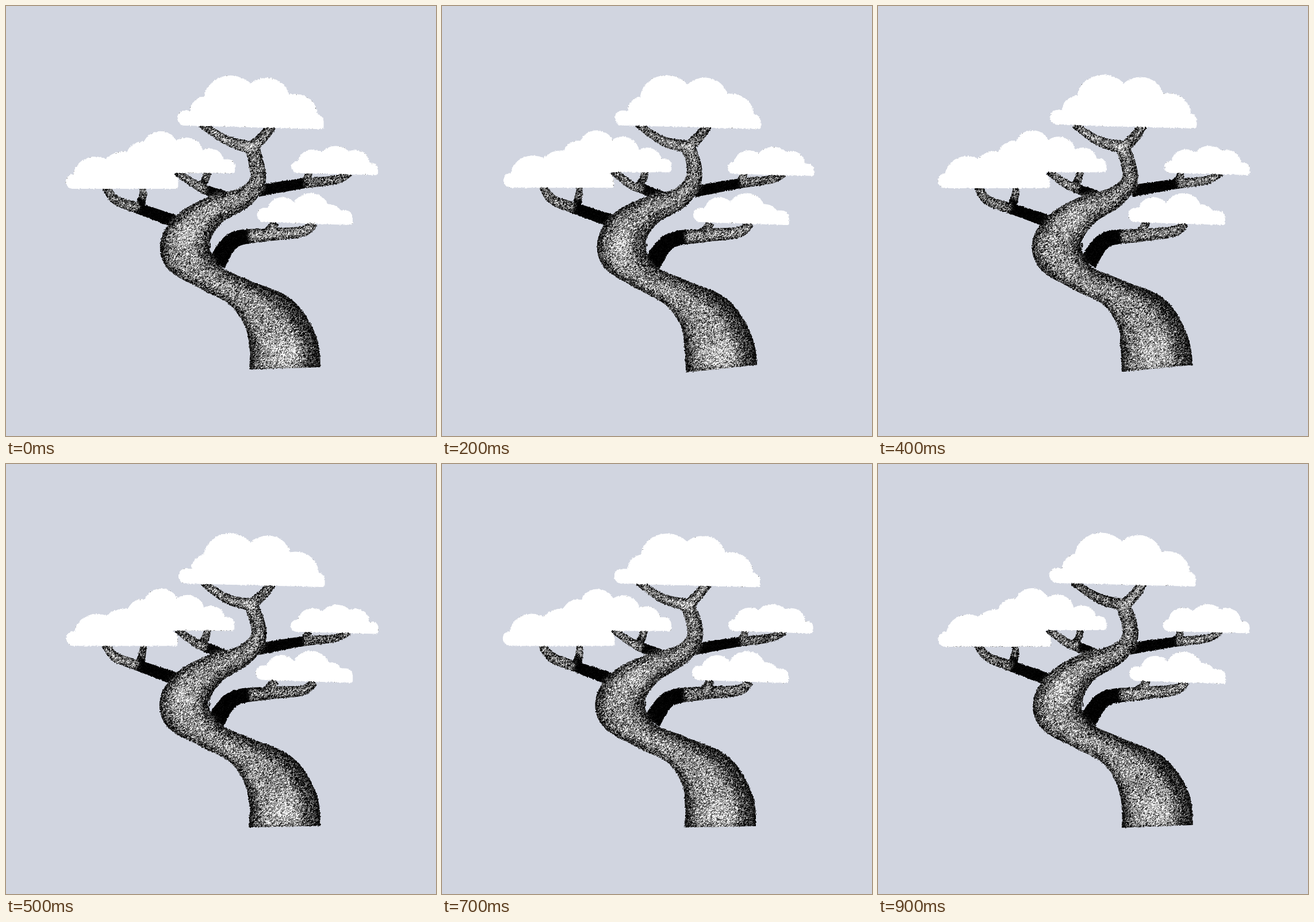
Recreate the animation shown at these times as an HTML page with a canvas. Size 748 px wide and 748 px high, loop 1000 ms.

```html
<!DOCTYPE html>
<html lang="en">
<head>
<meta charset="utf-8">
<title>Cloud bonsai</title>
<style>
html, body { margin: 0; height: 100%; overflow: hidden; background: #d1d5e0; }
canvas { display: block; width: 748px; height: 748px; }
</style>
</head>
<body>
<canvas id="stage" width="748" height="748"></canvas>
<script>
const S = 748, STEPS = 10, STEP_MS = 100;

// Spine from base to fork: x, y, half width
const TRUNK = [
  [485, 631, 62], [482, 590, 60], [460, 543, 50], [410, 500, 28], [352, 470, 26], [314, 428, 44],
  [324, 390, 38], [361, 356, 26], [413, 333, 18], [438, 305, 14], [437, 276, 13], [427, 246, 12]
];
// Limbs from tip to root: half width at both ends, then x, y points
const CROWN = [
  [6, 11, [340, 206], [385, 234], [427, 246]],
  [8, 10, [462, 208], [447, 226], [428, 246]]
];
const LIMBS = [
  [6, 10, [296, 288], [328, 310], [350, 320], [385, 333]],
  [6, 7, [352, 286], [349, 300], [341, 314]],
  [7, 11, [174, 314], [192, 337], [235, 353], [300, 376]],
  [5, 8, [239, 313], [238, 330], [234, 349]],
  [6, 10, [597, 291], [572, 303], [515, 309], [440, 322]],
  [6, 7, [526, 288], [524, 299], [519, 307]],
  [7, 16, [536, 378], [515, 393], [455, 399], [395, 408], [366, 448]],
  [7, 9, [468, 376], [461, 387], [452, 397]]
];
// Base line, tilt and height, then lobes: x, top, half width
const CLOUDS = [
  { x0: 299, x1: 553, y: 207, tilt: .026, h: 26,
    lobes: [[390, 120, 46], [454, 124, 40], [502, 152, 40], [350, 156, 29]] },
  { x0: 214, x1: 398, y: 290, tilt: 0, h: 24,
    lobes: [[238, 235, 27], [270, 217, 30], [314, 228, 29], [355, 247, 25]] },
  { x0: 105, x1: 300, y: 317, tilt: 0, h: 26,
    lobes: [[157, 261, 39], [207, 252, 42], [255, 255, 38]] },
  { x0: 497, x1: 647, y: 291, tilt: .025, h: 21,
    lobes: [[534, 250, 26], [575, 244, 31], [607, 251, 25]] },
  { x0: 436, x1: 605, y: 376, tilt: .034, h: 25,
    lobes: [[481, 333, 26], [531, 326, 32], [562, 345, 26]] }
];

let seed = 1;
const rnd = () => {
  seed = seed + 0x6D2B79F5 | 0;
  let t = Math.imul(seed ^ seed >>> 15, 1 | seed);
  t = t + Math.imul(t ^ t >>> 7, 61 | t) ^ t;
  return ((t ^ t >>> 14) >>> 0) / 4294967296;
};
const jit = a => (rnd() * 2 - 1) * a;

// Catmull-Rom curve through points of any dimension
function spline(pts, n = 12) {
  const out = [], last = pts.length - 1;
  for (let i = 0; i < last; i++) {
    const a = pts[Math.max(0, i - 1)], b = pts[i], c = pts[i + 1], d = pts[Math.min(last, i + 2)];
    for (let k = 0; k < n; k++) {
      const t = k / n;
      out.push(b.map((v, j) => v + t / 2 * (c[j] - a[j] +
        t * (2 * a[j] - 5 * v + 4 * c[j] - d[j] + t * (3 * (v - c[j]) + d[j] - a[j])))));
    }
  }
  return [...out, pts[last]];
}

const wobble = pts => spline(pts.map(([x, y, r]) => [x + jit(1.5), y + jit(1), r + jit(.4)]));

const limb = ([tip, root, ...pts]) =>
  wobble(pts.map((p, i) => [...p, tip + (root - tip) * i / (pts.length - 1)]));

// Line along a curve, u half widths off its spine
const edge = (pts, u) => pts.map(([x, y, r], i) => {
  const a = pts[Math.max(0, i - 1)], b = pts[Math.min(pts.length - 1, i + 1)];
  const dx = b[0] - a[0], dy = b[1] - a[1], k = u * r / Math.hypot(dx, dy);
  return [x - dy * k, y + dx * k];
});

function ribbon(pts, u = -1, v = 1) {
  const path = new Path2D();
  [...edge(pts, u), ...edge(pts, v).reverse()].forEach(p => path.lineTo(...p));
  return path;
}

function disc([x, y], r) {
  const path = new Path2D();
  path.arc(x, y, r, 0, 7);
  return path;
}

const g = new OffscreenCanvas(S, S).getContext('2d', { willReadFrequently: true });

function light(path, alpha, blur) {
  g.save();
  g.globalCompositeOperation = 'source-atop';
  g.filter = `blur(${blur}px)`;
  g.fillStyle = `rgba(255,255,255,${alpha})`;
  g.fill(path);
  g.restore();
}

// Limbs are lit from the tip and fall into shadow at the root
function drawLimbs(list, reach) {
  list.forEach(l => g.fill(ribbon(l)));
  for (const l of list) {
    light(ribbon(l.slice(0, l.length * reach)), .15, 2);
    light(ribbon(l.slice(3, l.length * reach), -.6, .6), .3 + rnd() * .25, 3);
  }
}

function drawTree() {
  drawLimbs(LIMBS.map(limb), .65);
  const trunk = wobble(TRUNK), n = trunk.length;
  g.fill(ribbon(trunk));
  drawLimbs(CROWN.map(limb), 1);
  light(ribbon(trunk, -.95, .95), .18, 4);
  light(ribbon(trunk, -.75, .5), .48, 7);
  light(disc(trunk[Math.floor(n * (.45 + rnd() * .2))], 18), .5, 12);
  light(disc(trunk[8], 28), .45, 14);
  light(disc(trunk[n - 1], 8), .3, 4);

  // Bark streaks
  g.lineWidth = 1.5;
  for (let k = 0; k < 12; k++) {
    const from = rnd() * n * .8, line = edge(trunk, k % 2 ? -.5 - rnd() * .4 : .2 + rnd() * .7);
    g.strokeStyle = `rgba(0,0,0,${.2 + rnd() * .3})`;
    g.beginPath();
    line.slice(from, from + 20 + rnd() * 30).forEach(p => g.lineTo(...p));
    g.stroke();
  }
}

function drawCloud({ x0, x1, y, tilt, h, lobes }) {
  const l = x0 + jit(2), r = x1 + jit(2), lift = jit(1), k = (r - l) / (x1 - x0);
  g.save();
  g.translate(l, y + lift);
  g.fillStyle = '#fff';
  for (const [cx, top, w] of lobes) {
    const x = (cx - x0) * k + jit(1.5), ry = w * .9;
    g.beginPath();
    g.ellipse(x, top - y + ry, w, ry, 0, Math.PI, 2 * Math.PI);
    g.lineTo(x + w, -4);
    g.lineTo(x - w, -4);
    g.fill();
  }
  g.transform(1, tilt, 0, 1, 0, 0);
  g.beginPath();
  g.roundRect(0, -h, r - l, h, [h / 2, h / 2, 4, h / 2]);
  g.fill();
  g.restore();
}

// Ragged edges for everything, grain for the grey bark
function roughen() {
  const img = g.getImageData(0, 0, S, S), out = img.data, src = out.slice(), half = S / 2;
  const off = () => Math.round(jit(.7));
  const shift = Int32Array.from({ length: half * half }, () => off() + S * off());
  const grain = Float32Array.from({ length: S * S }, rnd);
  for (let y = 2; y < S - 2; y++) for (let x = 2; x < S - 2; x++) {
    const i = y * S + x, j = 4 * (i + shift[(y >> 1) * half + (x >> 1)]);
    let [cr, cg, cb] = [src[j], src[j + 1], src[j + 2]];
    if (cb - cr < 4 && cr < 250) {
      const n = (grain[i] + grain[i - 1] + grain[i - S]) / 3 - .5;
      cr = cg = cb = cr + n * 400 * Math.min(1, (cr + 5) / 60);
    }
    out[4 * i] = cr;
    out[4 * i + 1] = cg;
    out[4 * i + 2] = cb;
  }
  return img;
}

function render(step) {
  seed = 101 + step * 7919;
  g.clearRect(0, 0, S, S);
  g.fillStyle = '#000';
  drawTree();
  CLOUDS.forEach(drawCloud);
  g.globalCompositeOperation = 'destination-over';
  g.fillStyle = '#d1d5e0';
  g.fillRect(0, 0, S, S);
  g.globalCompositeOperation = 'source-over';
  return roughen();
}

const frames = Array.from({ length: STEPS }, (_, i) => render(i));
const view = document.getElementById('stage').getContext('2d');
const start = performance.now();
let shown = -1;

function tick() {
  const step = Math.floor((performance.now() - start) / STEP_MS) % STEPS;
  if (step !== shown) view.putImageData(frames[shown = step], 0, 0);
  requestAnimationFrame(tick);
}
tick();
</script>
</body>
</html>
```
